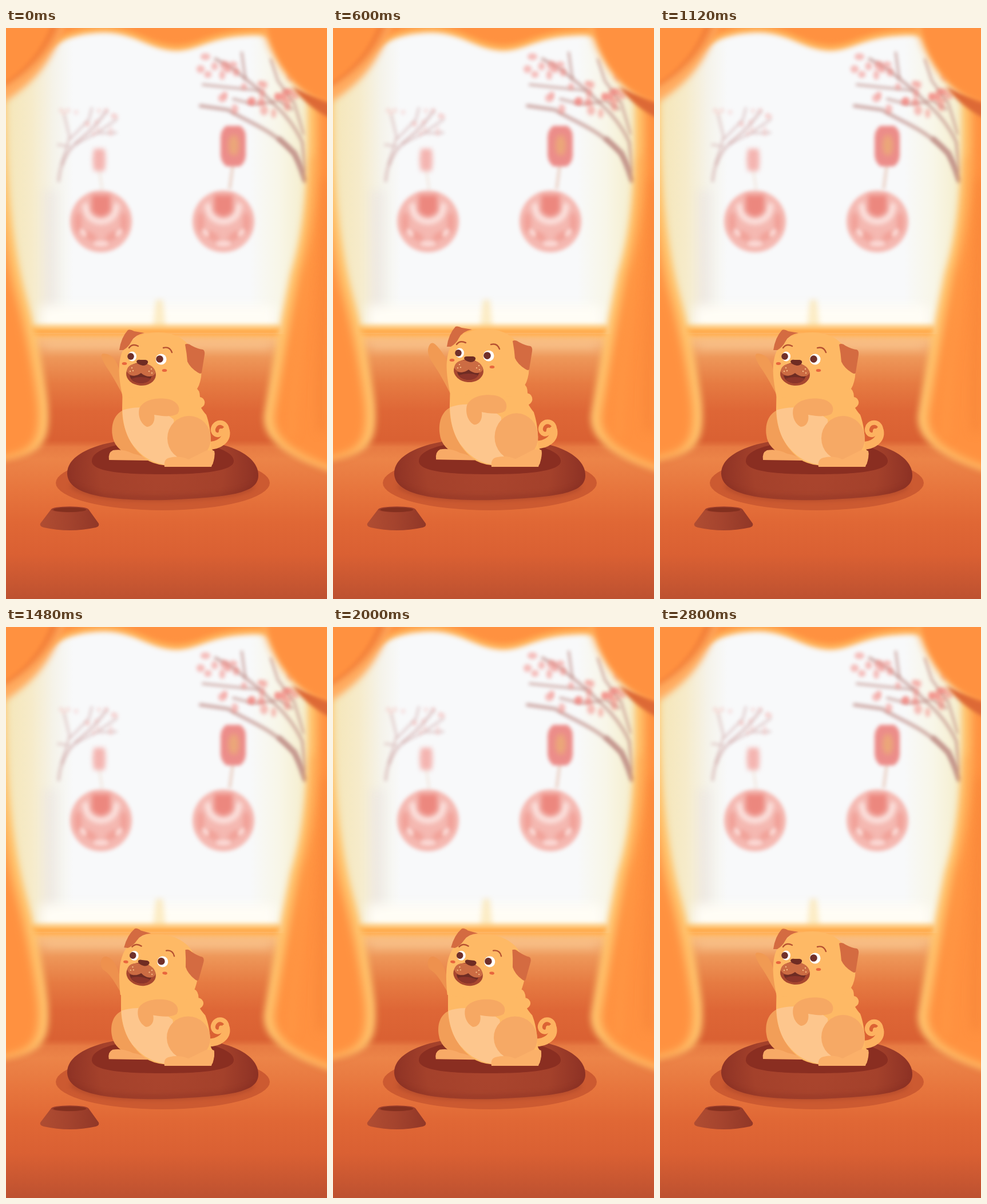
Write an HTML page with a canvas that moves like this. It is 561 by 998 pixels and loops after 3.04 s.

```html
<!DOCTYPE html>
<html lang="en">
<head>
<meta charset="utf-8">
<title>Waving pug</title>
<style>
  html, body { margin: 0; width: 100%; height: 100%; overflow: hidden; background: #e06735; }
  canvas { display: block; }
</style>
</head>
<body>
<canvas id="stage" width="561" height="998"></canvas>
<script>
const W = 561, H = 998, LOOP = 3040, STEP = 40, LAST = 2800;
const stage = document.getElementById('stage').getContext('2d');
const backdrop = document.createElement('canvas');
backdrop.width = W;
backdrop.height = H;
let c = backdrop.getContext('2d');

function fill(d, color, blur = 0) {
  c.filter = blur ? `blur(${blur}px)` : 'none';
  c.fillStyle = color;
  c.fill(new Path2D(d));
  c.filter = 'none';
}

function line(d, color, width, blur = 0) {
  c.filter = blur ? `blur(${blur}px)` : 'none';
  c.strokeStyle = color;
  c.lineWidth = width;
  c.lineCap = c.lineJoin = 'round';
  c.stroke(new Path2D(d));
  c.filter = 'none';
}

function oval(x, y, rx, ry, color, blur = 0, turn = 0) {
  c.filter = blur ? `blur(${blur}px)` : 'none';
  c.fillStyle = color;
  c.beginPath();
  c.ellipse(x, y, rx, ry, turn, 0, 7);
  c.fill();
  c.filter = 'none';
}

function stops(gradient, ...list) {
  list.forEach(([at, color]) => gradient.addColorStop(at, color));
  return gradient;
}

const vertical = (y0, y1, ...list) => stops(c.createLinearGradient(0, y0, 0, y1), ...list);
const across = (x0, x1, ...list) => stops(c.createLinearGradient(x0, 0, x1, 0), ...list);

function shifted(x, y, draw) {
  c.save();
  c.translate(x, y);
  draw();
  c.restore();
}

function seeded(seed) {
  return () => (seed = (seed * 16807) % 2147483647) / 2147483647;
}

function drawWindow() {
  c.fillStyle = across(0, W, [0, '#f5e6b8'], [.08, '#f6ebca'], [.15, '#f5f3ea'], [.21, '#f8f9fa'],
    [.76, '#f8f9fa'], [.85, '#f8f6e8'], [.94, '#f5edca'], [1, '#f5e3b0']);
  c.fillRect(0, 0, W, 540);
  fill('M66 285H88V515H66Z', 'rgba(225,215,220,.3)', 8);
  fill('M60 485H470V530H60Z', '#fffdf5', 10);
  fill('M262 475H274L279 525H257Z', 'rgba(250,220,150,.5)', 5);
}

function drawTrees() {
  const bark = 'rgba(186,132,126,.68)';
  line('M524 268C514 222 486 200 462 184C438 168 412 158 388 143L340 136', bark, 6, 3);
  line('M523 250L518 200C500 160 472 136 442 108L398 72L366 54', bark, 5, 3);
  line('M522 265L505 219L478 194', bark, 9, 3);
  line('M520 185L504 132L475 92L463 55M443 109L400 105L344 99M418 88L412 43M470 129L432 133L397 124M500 142L475 126', bark, 4, 3);
  const random = seeded(71);
  for (let i = 0; i < 34; i++) {
    const along = random(), lift = random();
    oval(340 + along * 165, 42 + lift * 88 + along * 36, 4 + random() * 5, 4 + random() * 5,
      'rgba(242,126,120,.48)', 3);
  }
  const twig = 'rgba(205,160,160,.55)';
  line('M92 267C95 235 107 215 122 202C142 183 150 180 176 145', twig, 5, 3);
  line('M98 238L111 190L102 153M122 202L158 184L193 183M111 195L145 160L150 140M91 204L111 207M158 184L193 160', twig, 3.5, 3);
  for (let i = 0; i < 16; i++) {
    oval(95 + random() * 98, 143 + random() * 50, 4, 4, 'rgba(245,160,158,.28)', 3);
  }
}

function drawOrnament(x) {
  oval(x, 338, 54, 54, '#f5b9b2', 3);
  line(`M${x - 27} 311C${x - 26} 347 ${x + 26} 347 ${x + 27} 311`, 'rgba(252,232,228,.85)', 11, 4);
  fill(`M${x - 16} 292H${x + 16}V320Q${x} 338 ${x - 16} 320Z`, '#ec877e', 4);
  for (const side of [-1, 1]) {
    oval(x + side * 40, 340, 6, 18, 'rgba(239,142,132,.6)', 4);
    oval(x + side * 19, 364, 12, 7, 'rgba(239,142,132,.55)', 4, -side * .5);
    oval(x + side * 31, 358, 4, 8, 'rgba(253,232,228,.75)', 3, side * .6);
  }
  oval(x, 377, 13, 5, 'rgba(253,230,226,.7)', 3);
}

function drawLanterns() {
  line('M397 235L391 280', 'rgba(225,180,160,.7)', 4, 3);
  fill('M385 171H409Q419 177 419 190V223Q418 237 408 242H386Q376 236 375 222V190Q376 177 385 171Z', '#ec8d8a', 3);
  oval(398, 205, 9, 18, 'rgba(235,176,115,.75)', 5);
  line('M163 248L168 282', 'rgba(235,210,190,.55)', 3, 3);
  fill('M154 211H172Q176 230 172 250H154Q149 230 154 211Z', '#f4b5b1', 4);
  drawOrnament(166);
  drawOrnament(380);
}

function drawRoom() {
  c.fillStyle = vertical(535, 728, [0, '#ffc580'], [.1, '#f5b47b'], [.22, '#ee9658'],
    [.45, '#e67b42'], [.7, '#de6636'], [1, '#d96032']);
  c.fillRect(0, 535, W, 200);
  fill('M40 522H481V538H40Z', '#ffa745', 4);
  line('M50 522H475', 'rgba(255,211,126,.8)', 5, 4);
  fill('M70 548H458V560H70Z', 'rgba(249,195,141,.65)', 7);
  c.fillStyle = vertical(720, H, [0, 'rgba(228,115,62,0)'], [.045, '#e77b43'], [.12, '#ec8448'],
    [.32, '#e7753d'], [.52, '#e06735'], [.72, '#da6033'], [1, '#bd5130']);
  c.fillRect(0, 720, W, H - 720);
}

function drawCurtains() {
  const left = 'M-60 80L0 125C0 260 9 370 34 465C52 530 66 600 73 655C77 700 72 725 50 738C30 750 5 752 -60 765Z';
  const right = 'M640 80L527 125C529 270 522 350 497 430C478 520 464 600 451 675C447 715 480 745 570 775L640 800Z';
  for (const [shape, dx] of [[left, -17], [right, 17]]) {
    fill(shape, '#ffc46d', 6);
    shifted(dx, 0, () => fill(shape, '#ff9140', 8));
  }
  line('M540 230C540 420 500 560 500 710', 'rgba(255,157,72,.5)', 12, 8);
  line('M561 270C558 440 548 590 552 700', 'rgba(239,123,50,.45)', 13, 9);

  const valance = 'M-40 -60V50L75 38C98 18 130 9 170 8C225 8 250 38 296 40C340 40 355 12 445 13L620 40V-60Z';
  fill(valance, '#ffb45b', 4);
  shifted(0, -10, () => fill(valance, '#ff9140', 5));

  fill('M-40 -40H112C98 15 78 78 0 127L-40 140Z', '#ffac60', 6);
  fill('M-40 -40H106C90 20 60 75 -40 122Z', '#f5833b', 6);
  fill('M-40 -40H88C72 30 40 75 -40 118Z', '#ff9140', 3);
  fill('M620 -40H440C452 50 500 105 561 148L620 180Z', '#ffac5a', 7);
  fill('M500 102C526 116 545 122 590 133V170C547 150 520 130 500 102Z', '#dd6936', 3);
  fill('M620 -40H450C457 46 500 108 561 129L620 145Z', '#ff9140', 4);
}

function drawFurniture() {
  oval(274, 795, 187, 48, '#cc5a31');
  const rim = stops(c.createRadialGradient(272, 775, 20, 272, 770, 180),
    [0, '#a9442d'], [.55, '#a4412b'], [.85, '#923526'], [1, '#872d21']);
  fill('M107 778C107 745 160 717 274 716C385 717 441 745 441 782C441 814 390 820 280 825C160 827 107 812 107 778Z', rim);
  line('M116 801C150 822 215 823 280 822C350 820 408 817 430 802', 'rgba(130,42,31,.45)', 6, 4);
  fill('M150 757C150 735 200 722 274 722C350 722 398 738 398 757C398 775 340 780 274 780C200 780 150 775 150 757Z', '#8a2e21');
  fill('M79 841L60 866Q58 871 66 873Q111 883 157 873Q164 871 162 866L144 841Z',
    across(59, 163, [0, '#b04d32'], [.45, '#a5442e'], [1, '#913727']));
  oval(111.5, 841.5, 32.5, 5.2, '#9d3e2b');
  oval(111.5, 842, 29, 4, '#83301f');
}

drawWindow();
drawTrees();
drawLanterns();
drawRoom();
drawCurtains();
drawFurniture();

const FUR = '#feb965', EAR = '#d46b41', DARK = '#6f2c23', LIP = '#a8472f';

const ease = x => (x = Math.min(1, Math.max(0, x)), x * x * (3 - 2 * x));
const hump = (t, a, b, d, e) => ease((t - a) / (b - a)) * (1 - ease((t - d) / (e - d)));

function poseAt(t) {
  return {
    up: t < 1120 ? Math.sin(Math.PI * t / 1120) ** 2 : 0,
    low: hump(t, 1090, 1490, 2080, 2790),
    ear: hump(t, 1090, 1490, 1990, 2650)
  };
}

// Each joint: resting place, then its places when raised and lowered.
const ARM = [
  [209, 646, 209, 644, 207, 646],
  [200, 600, 204, 588, 199, 605],
  [188, 573, 186, 559, 186, 579],
  [165, 567, 171, 546, 168, 574],
  [169, 583, 163, 569, 164, 596],
  [186, 608, 186, 603, 181, 606],
  [205, 643, 204, 637, 203, 643]
];

function drawWavingArm({ up, low }) {
  const p = ARM.map(([x, y, ux, uy, lx, ly]) =>
    [x + (ux - x) * up + (lx - x) * low, y + (uy - y) * up + (ly - y) * low]);
  c.fillStyle = low > .5 ? '#ee914e' : '#f19a53';
  c.beginPath();
  c.moveTo(...p[0]);
  for (let i = 1; i < p.length - 1; i++) {
    const [x, y] = p[i], [nx, ny] = p[i + 1];
    c.quadraticCurveTo(x, y, (x + nx) / 2, (y + ny) / 2);
  }
  c.lineTo(...p[p.length - 1]);
  c.fill();
}

function withBody({ up, low }, draw) {
  const base = 767, tall = 1 + .053 * up - .027 * low, lean = .009 * up - .02 * low;
  c.save();
  c.transform(1, 0, -lean, tall, lean * base, base * (1 - tall));
  draw();
  c.restore();
}

function withHead(up, tilt, draw) {
  c.save();
  c.translate(219 + up, 607 - 6 * up);
  c.rotate(.113 * tilt);
  c.translate(-219, -607);
  draw();
  c.restore();
}

function drawTail({ up, low }) {
  shifted(up, -1.5 * up - 3.5 * low, () => {
    line('M350 730C373 731 387 719 384 704', '#fdb260', 14);
    line('M386 707C389 687 366 684 362 700C360 712 376 716 376 704', '#fdb260', 8);
  });
}

function drawBody() {
  fill('M207 667C191 673 183 690 186 712C188 728 198 736 206 742L258 756L255 680Z', '#f29e58');
  fill('M180 755Q178 742 187 738Q205 735 222 744Q240 747 249 756Z', '#f8aa66');
  fill('M204 615L203 667C203 700 218 737 250 757Q270 767 300 764L361 763Q366 748 364 740' +
    'Q358 738 358 726C358 706 355 690 350 676Q346 672 341 664Q349 659 347 652Q345 646 339 645' +
    'Q339 632 331 629Z', FUR);
}

function drawLimbs() {
  fill('M203.500 668C228 660 264 660 293 684L300 764C270 766 244 756 227 735C211 718 204 693 203.500 668Z', '#fdc68d');
  fill('M233 665C240 650 261 646 279 648C299 650 307 664 300 674C290 681 270 678 259 676C261 687 256 697 246 697C236 692 230 679 233 665Z', '#f6a863');
  oval(320, 717, 38, 39, '#f6a965');
  fill('M277 767Q275 753 286 751Q304 747 319 754L351 738L364 739Q366 748 359 767Z', '#fbb069');
}

function drawSkull(low) {
  const edge = 341 - 7 * low;
  fill(`M204 645C197 612 196 593 200 576C206 549 232 532 266 532C299 532 320 548 329 570` +
    `C337 583 ${edge + 2} 595 ${edge} 610Q${edge - 3} 628 ${331 - 4 * low} 634L310 651Z`, FUR);
}

function drawMuzzle() {
  oval(236, 605, 26, 20, LIP, 0, .08);
  fill('M216 607Q226 610 235 602Q245 610 255 607Q252 620 236 621Q219 620 216 607Z', DARK);
  fill('M219 613Q236 607 253 613Q248 621 236 621Q224 620 219 613Z', '#8c352a');
  fill('M211 599C213 587 227 585 237 588C250 586 260 592 261 603C258 610 246 612 236 603C226 611 214 608 211 599Z', '#cc6c43');
  for (const [x, y] of [[220, 594], [222, 599], [217, 600], [250, 600], [254, 596], [255, 603]]) {
    oval(x, y, 1.2, 1.2, '#f6bb84');
  }
  fill('M228 583Q229 579 235 580L244 580Q249 581 248 585Q246 590 239 590Q229 588 228 583Z', DARK);
}

function drawFace() {
  drawMuzzle();
  oval(220.500, 574, 7.500, 8.500, '#fff');
  oval(218, 574, 5.800, 6, '#71302a');
  oval(271, 579, 9.500, 9.500, '#fff');
  oval(268.500, 578.500, 6.300, 6.300, '#71302a');
  oval(207, 586.500, 4.300, 2.500, '#e8663d');
  oval(277, 598.500, 4.300, 2.500, '#e8663d');
  line('M215 559Q221 551 231 556', '#b75231', 2.4);
  line('M275 559Q286 556 290 567', '#b75231', 2.4);
}

function drawEars({ up, ear }) {
  withHead(up, ear, () => {
    shifted(3 * ear, -ear, () =>
      fill('M198 563Q201 541 213 528Q217 526 224 530L242 533Q225 536 219 548Q214 558 205 563Z', EAR));
    shifted(-5 * ear, ear, () =>
      fill('M313 553Q318 550 324 555Q335 561 344 562Q348 564 347 571L342 602Q341 606 335 602Q322 594 317 583Q316 569 313 553Z', EAR));
  });
}

function drawDog(pose) {
  drawWavingArm(pose);
  drawTail(pose);
  withBody(pose, drawBody);
  withHead(pose.up, pose.low, () => drawSkull(pose.low));
  withBody(pose, drawLimbs);
  withHead(pose.up, pose.low, drawFace);
  drawEars(pose);
}

c = stage;
const start = performance.now();

function render(now) {
  const elapsed = Math.max(0, now - start) % LOOP;
  const t = Math.min(LAST, Math.floor(elapsed / STEP) * STEP);
  c.drawImage(backdrop, 0, 0);
  drawDog(poseAt(t));
  requestAnimationFrame(render);
}

render(start);
</script>
</body>
</html>
```
